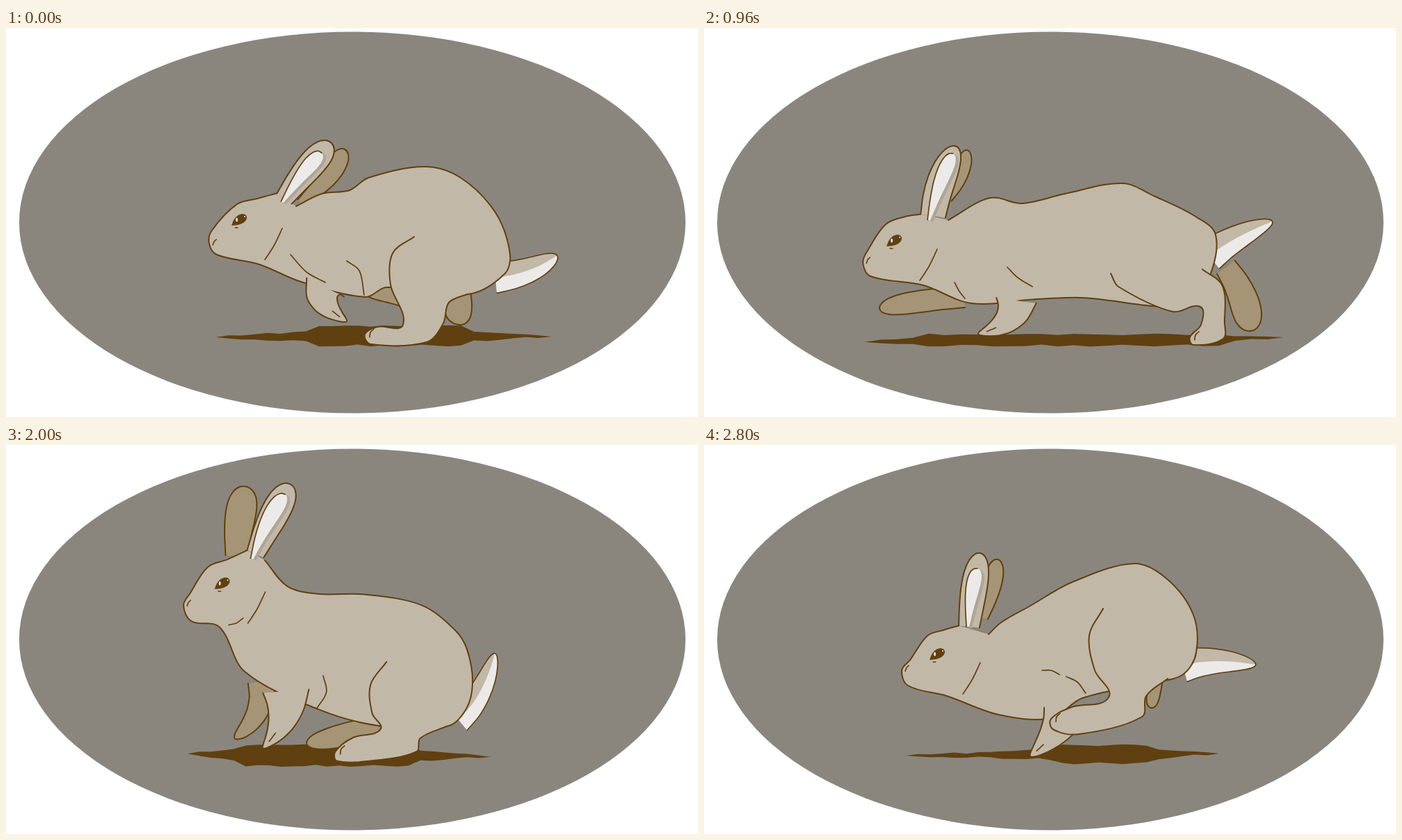
These frames come from a looping animation (997x561 px, 2880 ms). An HTML page:

```html
<!DOCTYPE html>
<html lang="en">
<head>
<meta charset="utf-8">
<title>Running rabbit</title>
<style>
html, body { margin: 0; width: 100%; height: 100%; overflow: hidden; background: #fff; }
svg { display: block; width: 997px; height: 561px; }
path { stroke-linejoin: round; stroke-linecap: round; }
</style>
</head>
<body>
<svg id="stage" viewBox="0 0 997 561">
  <ellipse cx="499" cy="280.5" rx="480" ry="275" fill="#8a867e"/>
</svg>
<script>
const INK = '#604010', FUR = '#c2b8a8', FAR = '#a69477', WHITE = '#ebeae8', SHADE = '#aea498';
const STEP = 80, COUNT = 36;

// Blades (ears, limbs, tail): base, bend, tip, base width, tip width.
// Shadow: left tip, right tip, top left and bottom right of the core.
const gather = {
  eye: [337, 276],
  ear: [401, 246, 436, 198, 469, 166, 26, 56],
  inner: [398, 251, 430, 202, 455, 180, 4, 36],
  farEar: [424, 252, 465, 222, 488, 175, 12, 48],
  front: [460, 374, 448, 398, 491, 423, 60, 14],
  farFront: [575, 385, 550, 380, 520, 384, 36, 18],
  farHind: [650, 378, 655, 405, 648, 427, 36, 42],
  tail: [705, 360, 755, 355, 794, 328, 45, 28],
  body: [362, 246, 333, 254, 296, 293, 293, 312, 304, 327, 365, 341, 425, 366, 518, 388, 548, 374, 665, 384,
    718, 355, 726, 325, 705, 266, 655, 216, 603, 200, 522, 216, 495, 234, 455, 239, 418, 257],
  hind: [588, 301, 557, 325, 554, 370, 572, 428, 535, 431, 517, 442, 526, 456, 606, 453, 630, 426, 638, 396, 664, 384],
  marks: [410, 327, 433, 352, 460, 367, 491, 336, 509, 350, 516, 385],
  shadow: [302, 446, 786, 445, 440, 430, 668, 458]
};
const extend = {
  eye: [275, 306],
  ear: [328, 271, 335, 215, 353, 166, 36, 50],
  inner: [323, 277, 334, 215, 350, 177, 4, 40],
  farEar: [345, 245, 357, 215, 368, 169, 20, 36],
  front: [450, 393, 445, 430, 395, 441, 58, 14],
  farFront: [375, 388, 310, 392, 253, 405, 30, 34],
  farHind: [742, 350, 760, 395, 766, 437, 34, 34],
  tail: [728, 328, 765, 300, 819, 279, 48, 24],
  body: [290, 272, 262, 283, 237, 319, 229, 338, 240, 358, 316, 371, 385, 397, 480, 391, 545, 389, 700, 400,
    728, 360, 737, 298, 705, 270, 650, 243, 603, 224, 520, 239, 458, 253, 412, 245, 352, 277],
  hind: [586, 354, 597, 373, 675, 409, 715, 402, 716, 428, 700, 446, 705, 457, 748, 448, 750, 425, 747, 372, 718, 348],
  marks: [361, 367, 368, 380, 376, 390, 437, 345, 452, 360, 473, 373],
  shadow: [231, 453, 835, 446, 310, 442, 750, 458]
};
const tuck = {
  eye: [337, 301],
  ear: [382, 262, 388, 205, 398, 156, 30, 50],
  inner: [380, 262, 384, 210, 394, 178, 4, 34],
  farEar: [404, 250, 413, 215, 423, 165, 10, 42],
  front: [518, 390, 506, 420, 470, 449, 60, 16],
  farFront: [575, 348, 565, 350, 552, 356, 10, 8],
  farHind: [652, 338, 648, 358, 644, 379, 18, 20],
  tail: [690, 318, 735, 306, 795, 317, 48, 24],
  body: [345, 267, 322, 275, 297, 310, 285, 325, 294, 347, 350, 362, 425, 389, 500, 394, 545, 365, 650, 342,
    690, 331, 709, 300, 705, 245, 668, 194, 620, 171, 530, 198, 470, 232, 428, 256, 410, 273],
  hind: [575, 236, 555, 275, 563, 325, 583, 364, 530, 378, 500, 395, 503, 410, 540, 417, 631, 392, 637, 362, 668, 337],
  marks: [487, 325, 500, 325, 512, 331, 522, 334, 538, 342, 550, 358],
  shadow: [291, 448, 742, 445, 500, 433, 650, 459]
};
const land = {
  eye: [320, 147],
  ear: [356, 126, 362, 88, 403, 116, 12, 46],
  inner: [372, 137, 370, 125, 360, 111, 6, 34],
  farEar: [361, 104, 366, 82, 331, 79, 30, 20],
  front: [395, 305, 382, 360, 400, 409, 68, 24],
  farFront: [350, 250, 352, 320, 326, 388, 36, 42],
  farHind: [490, 345, 548, 405, 434, 435, 60, 26],
  tail: [632, 360, 672, 335, 706, 276, 50, 22],
  body: [328, 112, 300, 124, 272, 160, 265, 175, 273, 198, 318, 211, 340, 275, 425, 325, 515, 366, 612, 373,
    643, 348, 653, 318, 648, 265, 629, 222, 590, 193, 510, 170, 450, 157, 413, 156, 388, 126],
  hind: [549, 287, 516, 325, 515, 370, 537, 401, 500, 427, 473, 441, 477, 455, 530, 452, 591, 412, 580, 388, 612, 373],
  marks: [335, 203, 328, 205, 315, 207, 497, 297, 480, 313, 430, 325],
  shadow: [249, 446, 702, 448, 365, 435, 590, 461]
};
const sit = {
  eye: [311, 207],
  ear: [358, 165, 382, 110, 409, 65, 26, 60],
  inner: [353, 172, 372, 115, 401, 79, 4, 40],
  farEar: [330, 168, 334, 110, 345, 68, 30, 62],
  front: [405, 365, 412, 410, 364, 443, 66, 12],
  farFront: [372, 360, 378, 405, 330, 430, 40, 18],
  farHind: [545, 418, 490, 418, 433, 430, 28, 36],
  tail: [655, 400, 690, 370, 704, 303, 40, 24],
  body: [318, 173, 289, 184, 264, 222, 254, 240, 266, 263, 305, 270, 345, 335, 455, 390, 540, 410, 640, 410,
    667, 385, 676, 345, 668, 300, 652, 275, 600, 236, 515, 222, 450, 224, 404, 211, 370, 172],
  hind: [548, 318, 527, 350, 530, 390, 540, 412, 500, 421, 475, 442, 477, 456, 535, 455, 592, 448, 600, 430, 640, 412],
  marks: [343, 259, 333, 267, 322, 270, 449, 340, 458, 365, 452, 390],
  shadow: [264, 445, 697, 450, 335, 432, 595, 463]
};

const lerp = (a, b, t) => a + (b - a) * t;
function mix(a, b, t) {
  const out = {};
  for (const k in a) out[k] = a[k].map((v, i) => lerp(v, b[k][i], t));
  return out;
}
const EARS = ['farEar', 'ear', 'inner'];
const UPPER = [...EARS, 'eye', 'body', 'tail'];
function shift(pose, parts, dx, dy) {
  const out = { ...pose };
  for (const k of parts) {
    const end = k === 'body' ? Infinity : 6;
    out[k] = pose[k].map((v, i) => i < end ? v + (i % 2 ? dy : dx) : v);
  }
  return out;
}

const extendBack = {
  ...extend,
  ear: [330, 271, 337, 220, 364, 171, 36, 50],
  inner: [324, 277, 338, 220, 359, 181, 4, 36],
  farEar: [350, 245, 372, 215, 379, 176, 16, 32],
  farHind: [752, 345, 782, 385, 787, 437, 32, 52]
};
const extendHigh = shift(extend, [...UPPER, 'farFront'], 2, -4);
const perk = { ...mix(land, sit, 0.5), ...shift({ ear: sit.ear, inner: sit.inner, farEar: sit.farEar }, EARS, 4, -30) };
const crouch = shift(sit, UPPER, 0, 3);
const rise = shift(sit, EARS, -1, -4);

const keys = [
  [0, gather], [2, extend], [4, tuck], [5, gather], [7, extend], [9, tuck], [10, gather],
  [12, extendBack], [14, tuck], [15, gather], [17, extendHigh], [19, tuck], [21, land],
  [23, perk], [26, crouch], [29, sit], [30, rise], [33, extend], [35, tuck], [36, gather]
];
function poseAt(n) {
  const i = keys.findIndex(k => k[0] > n);
  const [a, from] = keys[i - 1], [b, to] = keys[i];
  return mix(from, to, (n - a) / (b - a));
}

const pairs = list => list.flatMap((v, i) => i % 2 ? [] : [[v, list[i + 1]]]);

// Smooth curve through points; handles follow each segment's own length.
function curve(pts) {
  const at = i => pts[Math.max(0, Math.min(pts.length - 1, i))];
  const dir = i => {
    const a = at(i - 1), b = at(i + 1);
    const d = Math.hypot(b[0] - a[0], b[1] - a[1]) || 1;
    return [(b[0] - a[0]) / d, (b[1] - a[1]) / d];
  };
  let d = 'M' + pts[0];
  for (let i = 0; i < pts.length - 1; i++) {
    const p = at(i), q = at(i + 1), u = dir(i), v = dir(i + 1);
    const h = Math.hypot(q[0] - p[0], q[1] - p[1]) * 0.33;
    d += `C${p[0] + u[0] * h},${p[1] + u[1] * h} ${q[0] - v[0] * h},${q[1] - v[1] * h} ${q}`;
  }
  return d;
}

// Edges of a tapered, round-tipped shape along a quadratic centre line.
function edges([bx, by, cx, cy, tx, ty, w0, w1], power) {
  const left = [], mid = [], right = [], n = 6;
  for (let i = 0; i <= n; i++) {
    const s = Math.sin(i / n * Math.PI / 2);
    const x = lerp(lerp(bx, cx, s), lerp(cx, tx, s), s);
    const y = lerp(lerp(by, cy, s), lerp(cy, ty, s), s);
    const dx = lerp(cx - bx, tx - cx, s), dy = lerp(cy - by, ty - cy, s);
    const h = lerp(w0, w1, s) / 2 * Math.sqrt(1 - s ** power) / Math.hypot(dx, dy);
    left.push([x + dy * h, y - dx * h]);
    mid.push([x, y]);
    right.unshift([x - dy * h, y + dx * h]);
  }
  return { left, mid, right };
}
const blade = power => list => {
  const { left, right } = edges(list, power);
  return curve([...left, ...right.slice(1)]);
};
const leaf = blade(3), limb = blade(5);
const tailTip = list => {
  const { mid, right } = edges(list, 5);
  return curve([...mid, ...right.slice(1)]);
};

function random(seed) {
  return () => (seed = seed * 16807 % 2147483647) / 2147483647;
}
// Brush streak: thin ragged ends around a thicker core.
function streak([lx, ly, rx, ry, cl, top, cr, bottom]) {
  const rnd = random(11), n = 26, pts = [];
  for (let i = 0; i <= 2 * n; i++) {
    const upper = i <= n, u = upper ? i / n : 2 - i / n;
    const x = lerp(lx, rx, u), y = lerp(ly, ry, u);
    const out = Math.min((x - lx) / (cl - lx), (rx - x) / (rx - cr));
    const full = out >= 1 ? 1 : out * 0.55;
    const jitter = u > 0 && u < 1 ? (rnd() - 0.5) * 3 : 0;
    pts.push([x, lerp(y, upper ? top : bottom, full) + jitter]);
  }
  return 'M' + pts.join('L') + 'Z';
}

function details(pose) {
  const from = ([x, y], ...steps) => curve(pairs(steps).map(([dx, dy]) => [x + dx, y + dy]));
  const body = pairs(pose.body), hind = pairs(pose.hind), marks = pairs(pose.marks);
  return from(body[3], 10, -7, 7, -4, 5, 1)
    + from(pose.eye, 61, 13, 49, 38, 36, 58)
    + from(hind[5], 13, -8, 8, -3, 7, 4)
    + curve(edges(pose.front, 5).mid.slice(3, 5))
    + curve(marks.slice(0, 3)) + curve(marks.slice(3));
}

const stage = document.getElementById('stage');
function add(tag, attrs, parent = stage) {
  const el = document.createElementNS('http://www.w3.org/2000/svg', tag);
  for (const k in attrs) el.setAttribute(k, attrs[k]);
  return parent.appendChild(el);
}

const outline = list => curve(pairs(list));
const layers = [
  [p => streak(p.shadow), INK, 0],
  [p => leaf(p.farEar), FAR, 2],
  [p => limb(p.farFront), FAR, 2],
  [p => limb(p.farHind), FAR, 2],
  [p => limb(p.tail), FUR, 0],
  [p => tailTip(p.tail), WHITE, 0],
  [p => limb(p.tail), 'none', 1.7],
  [p => curve([edges(p.ear, 3).left[0], ...pairs(p.body)]), FUR, 2],
  [p => limb(p.front), FUR, 2],
  [p => outline(p.hind), FUR, 2],
  [p => leaf(p.ear), FUR, 2],
  [p => leaf(p.inner), SHADE, 0, 'translate(4 2)'],
  [p => leaf(p.inner), WHITE, 0],
  [p => curve(edges(p.inner, 3).left), 'none', 1.7],
  [details, 'none', 1.7]
].map(([draw, fill, width, transform = '']) => ({
  draw, el: add('path', { fill, transform, stroke: width ? INK : 'none', 'stroke-width': width })
}));

const eye = add('g', {});
add('path', { d: 'M-12,9Q-8,-6 3,-8Q10,-8 10,-2Q8,8 -12,9Z', fill: INK }, eye);
add('ellipse', { cx: -4.5, cy: 0.5, rx: 1.4, ry: 3, fill: WHITE }, eye);
add('circle', { cx: 7, cy: -4, r: 1, fill: WHITE }, eye);
add('path', { d: 'M-7,12l4,0', stroke: INK, 'stroke-width': 1.3 }, eye);

let shown = -1;
function render(n) {
  if (n === shown) return;
  shown = n;
  const pose = poseAt(n);
  for (const l of layers) l.el.setAttribute('d', l.draw(pose));
  eye.setAttribute('transform', `translate(${pose.eye})`);
}

const start = performance.now();
function tick() {
  render(Math.floor((performance.now() - start) / STEP) % COUNT);
  requestAnimationFrame(tick);
}
tick();
</script>
</body>
</html>
```
